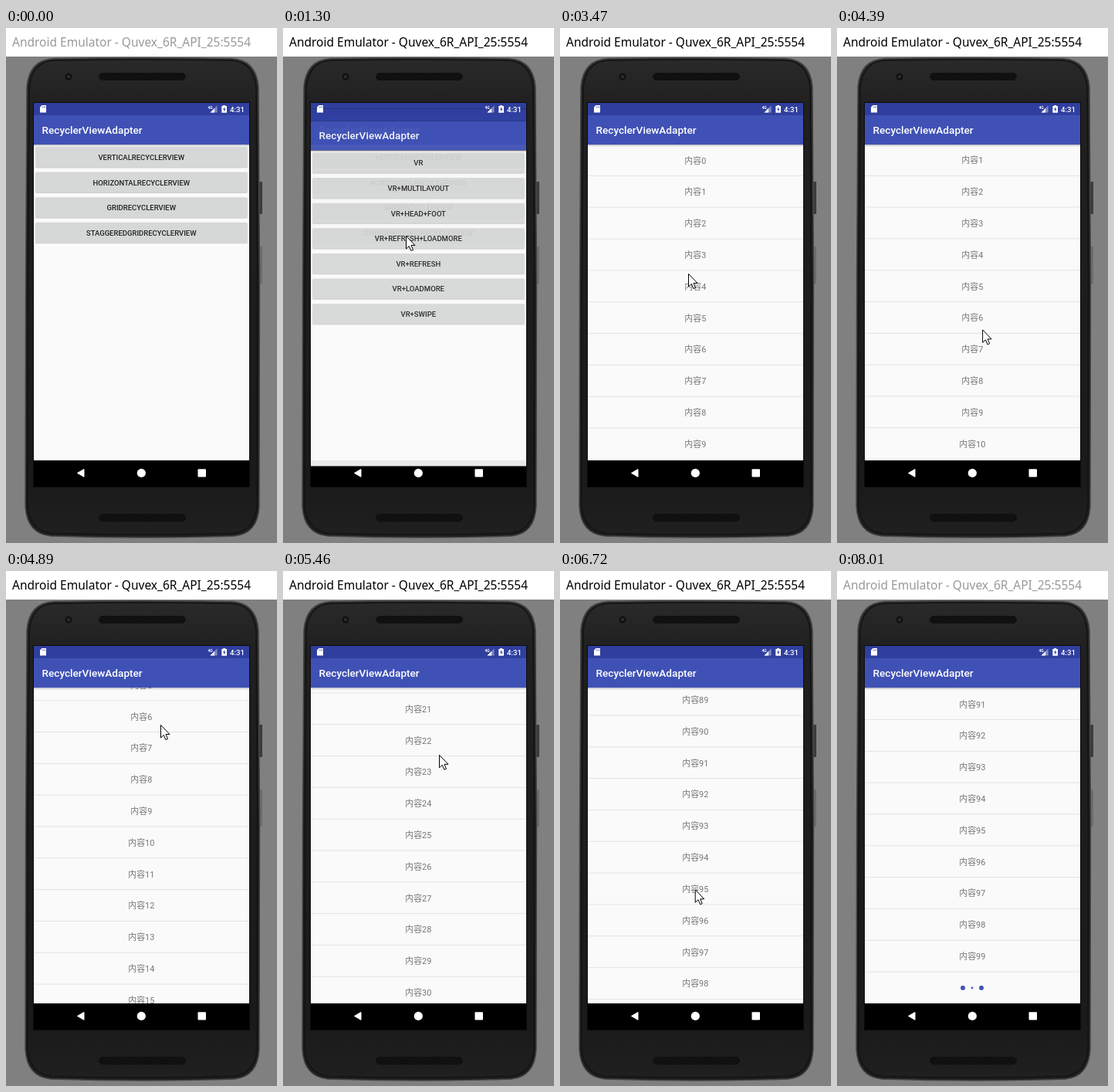
Animation, 351 px wide and 667 px high, one loop 8080 ms. Source, as an HTML page:

```html
<!DOCTYPE html>
<html lang="en">
<head>
<meta charset="utf-8">
<title>RecyclerView demo</title>
<style>
  html, body { margin: 0; width: 100%; height: 100%; overflow: hidden; background: #808080; }
  svg { display: block; width: 100%; height: 100%; }
  text { font-family: Roboto, "Noto Sans CJK SC", "Noto Sans CJK", sans-serif; }
  .win { font: 15.5px "Noto Sans", "Open Sans", sans-serif; }
  .bar { font-size: 13.6px; font-weight: 500; fill: #fff; }
  .btn { font-size: 9.5px; font-weight: 500; fill: #212121; text-anchor: middle; }
  .row { font-size: 10.9px; fill: #757575; text-anchor: middle; }
  .clock { font-size: 9.6px; font-weight: 500; fill: #fff; text-anchor: end; }
</style>
</head>
<body>
<svg id="stage" viewBox="0 0 351 667" preserveAspectRatio="none">
  <defs>
    <linearGradient id="body" x1="0" y1="0" x2="0" y2="1">
      <stop offset="0" stop-color="#2a2a2a"/>
      <stop offset=".1" stop-color="#202020"/>
      <stop offset=".88" stop-color="#1a1a1a"/>
      <stop offset="1" stop-color="#202020"/>
    </linearGradient>
    <linearGradient id="shade" x1="0" y1="0" x2="0" y2="1">
      <stop offset="0" stop-color="#000" stop-opacity=".24"/>
      <stop offset="1" stop-color="#000" stop-opacity="0"/>
    </linearGradient>
    <pattern id="mesh" width="4" height="4" patternUnits="userSpaceOnUse">
      <rect width="4" height="4" fill="#0c0c0c"/>
      <path d="M0 4L4 0" stroke="#222" stroke-width=".8"/>
    </pattern>
    <clipPath id="screen"><rect x="36" y="97" width="279" height="497"/></clipPath>
    <clipPath id="content"><rect x="36" y="151" width="279" height="409"/></clipPath>
  </defs>

  <rect width="351" height="667" fill="#808080"/>
  <rect width="351" height="37" fill="#fff"/>
  <text id="caption" class="win" x="8" y="24">Android Emulator - Quvex_6R_API_25:5554</text>

  <rect x="328" y="199" width="4" height="42" rx="1" fill="#3c3c3c"/>
  <rect x="328" y="283" width="4" height="48" rx="1" fill="#6c6c6c"/>
  <path d="M62 39.5Q176 37.5 292 39.5Q324 41 327 76L328.500 330L328 620Q326 655 296 658Q176 662 58 658Q27 655 25 620L25.500 330L27 76Q30 41 62 39.500Z"
        fill="url(#body)" stroke="#484848" stroke-width="1.400"/>
  <path d="M63 42Q176 40 291 42Q321 43 324 78L325.500 330L325 618Q323 651 295 654.500Q176 658 59 654.500Q30 651 28 618L28.500 330L30 78Q33 43 63 42Z"
        fill="none" stroke="#131313" stroke-width="1.500"/>
  <circle cx="81" cy="63" r="4.500" fill="#111"/>
  <circle cx="81" cy="63" r="2" fill="#303030"/>
  <rect x="120.500" y="58.500" width="112" height="9" rx="4.500" fill="url(#mesh)" stroke="#111"/>
  <rect x="120.500" y="629.500" width="112" height="9.500" rx="4.700" fill="url(#mesh)" stroke="#111"/>
  <rect x="35" y="96" width="281" height="499" fill="#0b0b0b"/>

  <g id="screens" clip-path="url(#screen)"></g>

  <g fill="#fff">
    <path d="M46.500 100H52V109.500H44V102.500Z"/>
    <path d="M47.200 101.500V103.500M49 101.500V103.500M50.700 101.500V103.500" stroke="#303f9f" stroke-width=".7"/>
    <text x="261.500" y="104.500" font-size="5" font-weight="700">4G</text>
    <path d="M273.500 100.500V109.500H264.500Z" opacity=".4"/>
    <path d="M270 104V109.500H264.500Z"/>
    <path d="M281.200 100H284V101H286V109.700H279.300V101H281.200Z"/>
    <path d="M283.200 102.200L281 105.800H282.500V108.500L284.500 104.800H283.200Z" fill="#303f9f"/>
    <text class="clock" x="309" y="108.600">4:31</text>
    <path d="M92.500 576.400L101 571.500V581.300Z" stroke="#fff" stroke-linejoin="round"/>
    <circle cx="175.300" cy="576.400" r="5.600"/>
    <rect x="248.500" y="571.300" width="10.500" height="10.200" rx="1"/>
  </g>
  <path id="cursor" d="M0 0V16.500L3.800 13L6.400 19L9 17.900L6.500 12H11.500Z" fill="#fff" stroke="#000" stroke-linejoin="round"/>
</svg>

<script>
const LOOP = 8080, STEP = 70, PITCH = 40.82, LAST = 100;
const BLUE = '#3f51b5';
const OPEN_VR = 1200, OPEN_LIST = 2920;
const $ = id => document.getElementById(id);
const clamp = v => Math.max(0, Math.min(1, v));

function el(parent, tag, attrs = {}, text) {
  const node = document.createElementNS('http://www.w3.org/2000/svg', tag);
  set(node, attrs);
  if (text) node.textContent = text;
  return parent.appendChild(node);
}
function set(node, attrs) {
  for (const key in attrs) node.setAttribute(key, attrs[key]);
}
function box(parent, x, y, width, height, fill, more) {
  return el(parent, 'rect', { x, y, width, height, fill, ...more });
}

// A full window: status strip, tool bar, content and navigation strip
function makeScreen(fill) {
  const root = el($('screens'), 'g');
  box(root, 36, 97, 279, 497, '#000');
  box(root, 36, 151, 279, 409, '#fafafa');
  fill(el(root, 'g', { 'clip-path': 'url(#content)' }));
  box(root, 36, 97, 279, 16, '#303f9f');
  box(root, 36, 113, 279, 38, BLUE);
  box(root, 36, 151, 279, 3, 'url(#shade)');
  el(root, 'text', { class: 'bar', x: 46.5, y: 137 }, 'RecyclerViewAdapter');
  return root;
}

const presses = [];
function makeMenu(labels, pressed, start, x, y) {
  return makeScreen(root => labels.forEach((label, i) => {
    const top = 154 + i * 32.62;
    const shadow = box(root, 38.2, top + 1, 274.6, 26.4, '#000', { rx: 1.6, opacity: .16 });
    box(root, 38.4, top, 274.2, 26, '#d6d7d7', { rx: 1.4 });
    if (i === pressed) {
      const clip = el(root, 'clipPath', { id: 'press' + start });
      box(clip, 38.4, top, 274.2, 26, '#000', { rx: 1.4 });
      const ink = el(root, 'g', { 'clip-path': `url(#press${start})` });
      const tint = box(ink, 38, top, 275, 26, '#000');
      const wave = el(ink, 'circle', { cx: x, cy: y });
      presses.push({ start, shadow, tint, wave, top });
    }
    el(root, 'text', { class: 'btn', x: 175.3, y: top + 16.9 }, label);
  }));
}

const rows = [], dots = [];
let footer;
makeMenu(['VERTICAL', 'HORIZONTAL', 'GRID', 'STAGGEREDGRID'].map(s => s + 'RECYCLERVIEW'), 0, 740, 160, 162);
const vr = makeMenu(['VR', ...['MULTILAYOUT', 'HEAD+FOOT', 'REFRESH+LOADMORE', 'REFRESH', 'LOADMORE', 'SWIPE']
  .map(s => 'VR+' + s)], 5, 2430, 165, 330);
const list = makeScreen(root => {
  for (let i = 0; i < 12; i++) {
    const g = el(root, 'g');
    box(g, 36, 40, 279, 1, '#e3e3e3');
    rows.push({ g, label: el(g, 'text', { class: 'row', x: 175.3, y: 24.5 }) });
  }
  footer = el(root, 'g');
  for (let i = 0; i < 3; i++) dots.push(el(footer, 'circle', { cx: 163 + 12 * i, cy: 20.5, fill: BLUE }));
});

// Display ticks: 70 ms steps counted from these moments
const ticks = [0, 740, 1960, 2430, 3470, 4320, 4890, 5170, 6020, 6860, 7700, 8010];
function tick(t) {
  const from = ticks.filter(a => a <= t).pop();
  return from + Math.floor((t - from) / STEP) * STEP;
}

const pointer = [
  [70, 285, 45], [340, 190, 120], [600, 160, 157], [1020, 160, 157], [1300, 159.5, 269.5],
  [1510, 154, 303], [1790, 164, 320], [1960, 164, 321], [2120, 164.5, 324.5], [3000, 164.5, 324.5],
  [3200, 166.5, 318.5], [3470, 166.5, 318.5], [3800, 172, 212], [4180, 184, 460], [4280, 186, 433],
  [4890, 200.5, 199.5], [5200, 190, 430], [5500, 205, 200], [5900, 161.5, 430], [6020, 161.5, 377.5],
  [6250, 175, 190], [6550, 165, 440], [6800, 180, 400], [7100, 205, 347], [7350, 230, 185], [7700, 297, 0]
];
const scroll = [
  [4280, 0], [4890, 227.9], [5170, 600], [5450, 850], [5750, 1800],
  [6020, 2549.7], [6250, 2950], [6520, 3420], [6790, 3713.6]
];
function at(keys, t) {
  const n = keys.findIndex(k => k[0] > t);
  if (n < 0) return keys[keys.length - 1].slice(1);
  if (n === 0) return keys[0].slice(1);
  const a = keys[n - 1], b = keys[n], p = (t - a[0]) / (b[0] - a[0]);
  return a.slice(1).map((v, i) => v + (b[i + 1] - v) * p);
}

// Window opening: quick fade, short slide upwards
function open(node, age) {
  const alpha = 1 - (1 - clamp(age / 200)) ** 4;
  const dy = 40 * (1 - clamp(age / 350)) ** 5;
  set(node, { opacity: alpha, transform: `translate(0 ${dy})`, visibility: age > 0 ? 'visible' : 'hidden' });
}

function drawPress({ start, shadow, tint, wave, top }, t) {
  const age = t - start + 20;
  const fade = age > 0 ? 1 - clamp((age - 420) / 250) : 0;
  const grow = clamp((age - 280) / 200);
  set(tint, { opacity: .045 * clamp(age / 100) * fade });
  set(wave, { r: Math.max(0, Math.min(age, 280) * .088 + 170 * grow), opacity: .05 * fade });
  const lift = clamp(age / 100) * fade;
  set(shadow, { y: top + 1 + lift, opacity: .16 + .06 * lift });
}

function drawList(t) {
  const y = at(scroll, t)[0], first = Math.floor(y / PITCH);
  const move = k => ({ transform: `translate(0 ${151 + k * PITCH - y})` });
  rows.forEach(({ g, label }, i) => {
    const k = first + i;
    set(g, { ...move(k), display: k < LAST ? 'inline' : 'none' });
    label.textContent = '内容' + k;
  });
  set(footer, move(LAST));
  const beat = Math.cos((t - 8010) / 700 * 2 * Math.PI);
  dots.forEach((dot, i) => set(dot, { r: 2.15 + .8 * (i === 1 ? -beat : beat) }));
}

function render(time) {
  const t = tick(time % LOOP);
  $('caption').setAttribute('fill', t >= 590 && t < 7840 ? '#000' : '#999');
  presses.forEach(p => drawPress(p, t));
  open(vr, t - OPEN_VR);
  open(list, t - OPEN_LIST);
  drawList(t);
  const [x, y] = at(pointer, t);
  set($('cursor'), { transform: `translate(${x} ${y})`, display: t >= 70 && t < 7750 ? 'inline' : 'none' });
}

const begin = performance.now();
function loop() {
  render(performance.now() - begin);
  requestAnimationFrame(loop);
}
loop();
</script>
</body>
</html>
```
